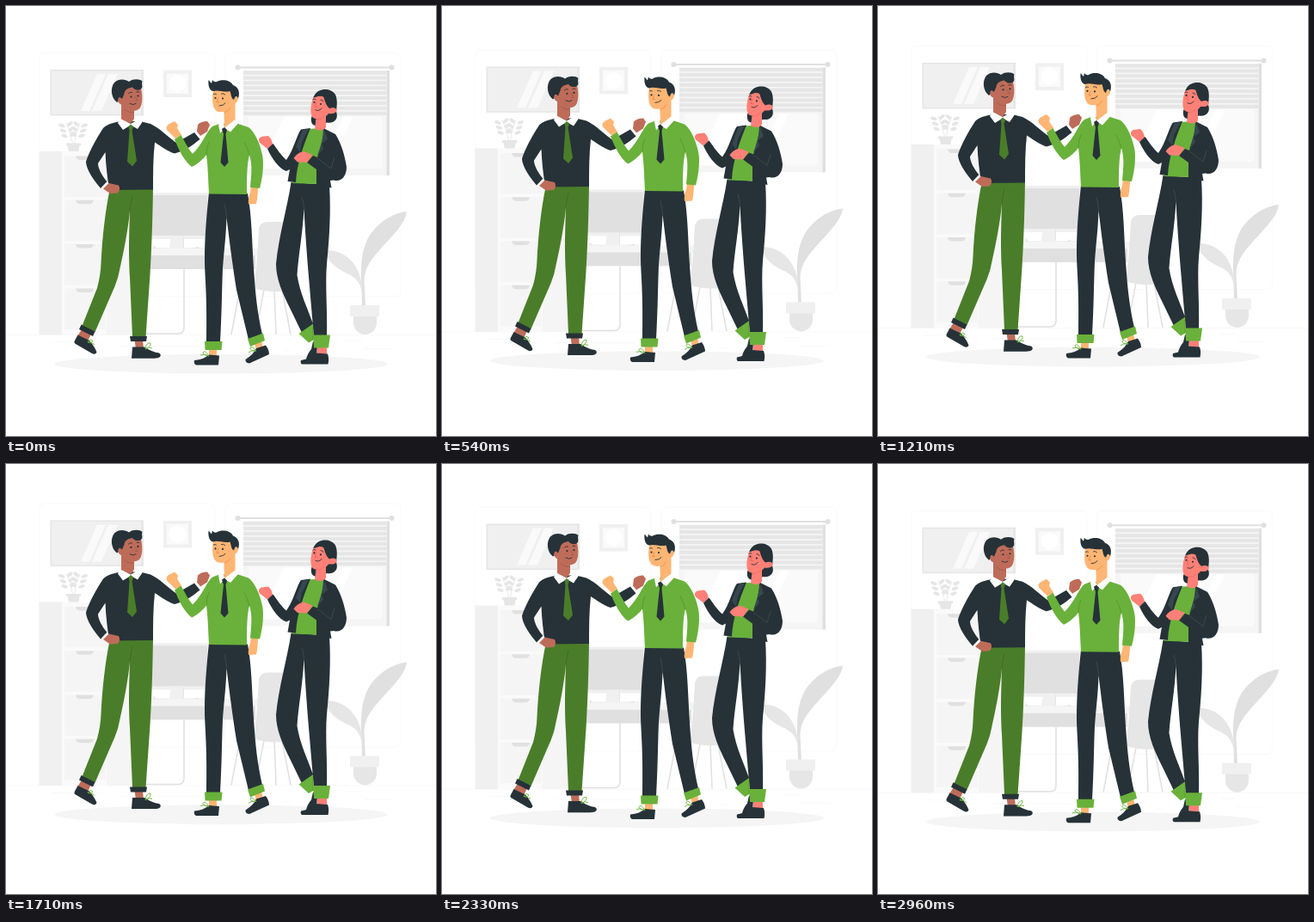
Recreate the animation shown at these times as an HTML page. Size 500x500 px, loop 3 s.

```html
<!DOCTYPE html>
<html lang="en">
<head>
<meta charset="utf-8">
<title>Three colleagues</title>
<style>
  html, body { margin: 0; width: 100%; height: 100%; overflow: hidden; background: #fff; }
  svg { display: block; width: 100%; height: 100%; }
  .pale { fill: #fafafa; } .light { fill: #f5f5f5; } .soft { fill: #f0f0f0; }
  .grey { fill: #e6e6e6; } .mid { fill: #e0e0e0; } .white { fill: #fff; }
  .dark { fill: #263238; } .slate { fill: #37474f; }
  .green { fill: #69b13a; } .moss { fill: #4a7d29; }
  .tan { fill: #be6c59; } .peach { fill: #ffb573; } .pink { fill: #ff8077; }
  .line { fill: none; stroke: #e0e0e0; stroke-width: 1.5; }
  .hair-line { fill: none; stroke: #ebebeb; stroke-width: .3; }
  .ink { fill: none; stroke: #263238; stroke-width: .9; stroke-linecap: round; }
  .lace { fill: none; stroke: #69b13a; stroke-width: .9; }
  .fold { fill: none; stroke: #000; stroke-opacity: .18; stroke-width: .8; }
  .glint { fill: none; stroke: #fff; stroke-opacity: .15; stroke-width: .7; }
</style>
</head>
<body>
<svg viewBox="0 0 500 500">
  <g id="scene">
    <!-- room -->
    <path class="hair-line" d="M0 382.5H500M416.8 398.6h33M322.5 401.3h8.7M396.6 389.3h19.2M52.500 391h43.200M104.600 391h6.300M131.500 395.200h93.700"/>
    <rect class="hair-line" x="38.700" y="54.700" width="204" height="283" rx="5.700"/>
    <rect class="hair-line" x="254.800" y="54.700" width="204" height="283" rx="5.700"/>

    <!-- pictures -->
    <rect class="grey" x="51.500" y="74" width="108.500" height="53.500"/>
    <rect class="soft" x="53" y="75.500" width="104.500" height="50.500"/>
    <path class="pale" d="M106 79h10L97 122H87zM119 79h11l-19 43h-11z"/>
    <rect class="soft" x="183" y="74.500" width="33" height="31.500"/>
    <rect class="pale" x="187" y="78.500" width="25" height="23.500"/>
    <circle class="white" cx="199.500" cy="90" r="10"/>

    <!-- window -->
    <rect class="light" x="276" y="75" width="167" height="122"/>
    <rect class="mid" x="442.500" y="75" width="3.500" height="122"/>
    <rect class="pale" x="282" y="80" width="155" height="109"/>
    <path class="white" d="M324 127h58l-29 62h-58zM393 127h11l-29 62h-11z"/>
    <g id="slats"></g>
    <path class="line" style="stroke-width:2" d="M270 71.500H448"/>
    <circle class="mid" cx="269.500" cy="71.500" r="3"/>
    <circle class="mid" cx="448.500" cy="71.500" r="3"/>

    <!-- cabinet -->
    <rect class="light" x="116" y="169" width="31" height="213.500"/>
    <rect class="pale" x="65" y="169" width="52" height="213.500"/>
    <rect class="soft" x="38.500" y="169" width="26.500" height="213.500"/>
    <g id="drawers"></g>
    <g id="sprigs"></g>
    <path class="grey" d="M70 159.500h17v3h-1.500l-1 6.500H73l-1.500-6.500H70z"/>

    <!-- desk and chair -->
    <rect class="soft" x="164" y="217" width="72" height="54"/>
    <rect class="mid" x="168" y="220" width="66" height="47"/>
    <path class="soft" d="M192 267h14l1 14h-17zM168 281h64v3h-64z"/>
    <path class="grey" d="M206 268h1v13h-1zM172 278l3 4h12v1h-16zM215 282l9-2v3h-10z"/>
    <rect class="light" x="148" y="282" width="146" height="8"/>
    <rect class="mid" x="148" y="290" width="142" height="16"/>
    <path class="line" d="M207 306V374Q207 381 200 381H148"/>
    <path class="line" d="M273 323L262 382M300 330L290 382M312 330L314 382M321 330L331 382"/>
    <path class="grey" d="M294 259Q296 251 304 251H330V331Q305 334 288 328Q292 300 294 259Z"/>

    <!-- floor plant -->
    <path class="mid" d="M413.500 325C411 290 417 268 434 254C444 245 456 240 466 239C465 249 456 260 445 272C430 289 417 300 416.500 320L418 350H414Z"/>
    <path class="grey" d="M414 326C412 303 396 283 372 284C373 298 387 307 399 312C408 317 413 322 415 340Z"/>
    <path class="grey" d="M404 360H431V368A13.500 14 0 0 1 404 368Z"/>
    <rect class="soft" x="400" y="348" width="34" height="13"/>

    <ellipse class="light" cx="250" cy="416.200" rx="193.900" ry="11.300"/>

    <!-- left man -->
    <g>
      <path class="tan" d="M88 376L99 381L95 390L83 384ZM149.500 388H159L160 399H151Z"/>
      <path class="dark" d="M83.500 382.500L97 389Q103 396 105.500 402.500Q104 406 100 404L81 393Q78.500 391.500 80 389Z"/>
      <path class="dark" d="M147 396.500H161Q170 402.500 178 403.500Q181 405.500 179 408Q177 409.700 172 409.700H146Z"/>
      <path class="lace" d="M95 391q2-5 6-1.500q-1 2.500-6 1.500q5 0 8 3M162 399q1-8 6-7q1 4-6 7q5-3 8-1"/>
      <path class="moss" d="M121 212C115 240 112 270 110.500 299Q110 313 106 328L88.500 372L103.500 379L126.500 326Q131 315 132.500 305C137 285 142 260 144 238C143 270 142.500 285 144 315L147 385H162.500L167.500 312C170 270 170.500 240 171 212Z"/>
      <path class="fold" d="M144 238Q145 229 147 221"/>
      <path class="dark" d="M87.500 370.500L103.500 378.500L101 384L85 376ZM144 384H164L163 390H145Z"/>
      <path class="white" d="M219 147L222 145L227 154L224 156Z"/>
      <path class="tan" d="M222 146L223 138Q227 134 234 134L237 138L234 146L226 151Z"/>
      <path class="dark" d="M134 134C127 135 118 137 113 142C105 154 97 169 93 181C93 190 103 204 110.500 212.500L118 205C112 198 107 189 107 183L115.500 170C116 185 118 200 120 214L171 213.500C171 195 171 176 173 158.500C180 163 188 169 196 171.500C207 169 217 162 225.500 155L219 147L198 159C189 153 179 142 168 137L156 134Z"/>
      <path class="white" d="M110 212L117.500 204L120 207L113 214Z"/>
      <path class="tan" d="M113 212.500L119.500 206L131 208.500Q133.500 213 130 217.500L121 218Z"/>
      <path class="white" d="M133.500 130.500L145 137L156 130.500L158.500 135L153 143L145 138.500L136 144L130 136Z"/>
      <path class="tan" d="M134 113H149V131L145 137L134 131.500Z"/>
      <path class="tan" d="M135 100C136 91 154 89 157 96C159 104 159 114 155.500 119C151 124 139 123 135.500 115Q130 114 130 108Q131 104 135 107Z"/>
      <path class="fold" d="M138 120Q143 125 149 123.500"/>
      <path class="dark" d="M129 112C122 107 121 95 126 89C131 84 139 85 143 88C148 84 156 85 158.500 87.500C157 91 160 94 157 96.500C153 99 149 97 147 94.500C143 95 138 97 137.500 102L135 108C131 104 130 108 130.500 111Z"/>
      <path class="moss" d="M142.500 140L145 137.500L148 140L146.500 145L152 180L147 186.500L141 181L143.500 145Z"/>
      <circle class="dark" cx="145.500" cy="105.500" r="1.100"/><circle class="dark" cx="153.500" cy="104.500" r="1.100"/>
      <path class="ink" d="M142.500 101.500q2-2 4-1M152 100q2-1 3 0M144 113.500q4 2.500 7 0"/>
      <path class="fold" d="M150 105l3 5h-3"/>
    </g>

    <!-- middle man -->
    <g>
      <path class="peach" d="M236 398H245V408H236ZM289 392L297 389L299 398L291 401Z"/>
      <path class="dark" d="M219 412Q230 411 236 405.500L248 406.500L247 417.500H221Q218 416 219 412ZM278.500 411Q288 405 291 398L302 394.500Q306 400 306 405L283 415.500Q278 415 278.500 411Z"/>
      <path class="lace" d="M236 407q-5-8-7-4q0 3 7 4q-6-3-10-1M291 401q-6-7-7-3q0 3 7 3q-6-1-9 2"/>
      <path class="dark" d="M236 217C233 245 231 270 231 295C231 315 234 330 233 391H249C251 355 251 330 252 305C254 280 256 265 256.500 246C260 275 263 298 268 330L282 388L298 382C292 355 290 335 288 305C286 275 286 245 281 218Z"/>
      <path class="glint" d="M256.500 246Q256 238 254 230"/>
      <path class="green" d="M231 390H251.500L250.500 400H231.500ZM281 387L299 380.500L301 389L284 396Z"/>
      <path class="peach" d="M285 209H293Q293 221 291 230L282 230.500Q281 224 284 217ZM197 154L187 144Q185 140 190 137L196 134L200 138L199 142L204 150Z"/>
      <path class="green" d="M248 137L240 140C233 146 229 160 217 172C212 166 208 158 203.500 150L196 155C201 168 208 181 216 187C223 184 229 178 233 173C235 188 235 203 236 218.500L280 219C280 201 280 184 283 173C287 185 285 198 284 211L295 212C299 197 300 182 298 173C295 159 289 146 282 141L267 136Z"/>
      <path class="fold" d="M283 174Q281 165 277 158M233 173Q233 164 236 158"/>
      <path class="white" d="M252 131.500L254 141L267 131.500L270 136.500L261 146.500L254 142.500L249 148L247 138Z"/>
      <path class="peach" d="M253 113H266.500V132L254 141.500Z"/>
      <path class="peach" d="M241 98C239.500 108 239.500 117 244 121.500C250 126 261 122 263.500 114Q269.500 113 270 107.500Q269 103.500 265 106L263 96Z"/>
      <path class="fold" style="stroke:#c35c10;stroke-opacity:.4" d="M254 124Q259 122 261 118"/>
      <path class="dark" d="M241 99C236 98 235 92 235.500 86L239 90L240 86Q242 89 245 88C251 84.500 261 86 264 92C270 94 272.500 100 270 107.500C268 103 266 105 265 109C261.500 107 262 103 260.500 99C254 101 247 97 241 99Z"/>
      <path class="dark" d="M251 143L254 141L257 144L255.500 149L258.500 182L254 187L249.500 182L253 149Z"/>
      <circle class="dark" cx="243.500" cy="107" r="1.100"/><circle class="dark" cx="252" cy="107.500" r="1.100"/>
      <path class="ink" d="M241.500 102.500q2-1 3 0M250.500 102q2-1 4 1M248 116q5 0 7-3"/>
      <path class="fold" style="stroke:#c35c10;stroke-opacity:.5" d="M247 107l-2 5h3"/>
    </g>

    <!-- woman -->
    <g>
      <path class="pink" d="M362 395H373V406H362Z"/>
      <path class="dark" d="M357 390L362 394L361 410L349 411Q350 405 355 399Z"/>
      <path class="dark" d="M343 412Q354 410 360 403.500L374 404.500Q376 410 374.500 416.500H344Q342 415 343 412Z"/>
      <path class="dark" d="M331.500 205C327 235 317 268 314 300C314 318 322 335 330 351L344.500 381L357.500 371C351 352 342 335 338.500 313C340 290 345 265 346.500 235C348 265 350 290 352 315L358 385H373C374 355 371 325 373 300C376 270 378 240 376 208Z"/>
      <path class="glint" d="M346.500 235Q346 228 344 222"/>
      <path class="green" d="M340.500 381L357 369.500L358 388L352 391.500Z"/>
      <path class="fold" d="M357 374V388"/>
      <path class="green" d="M357 382.500H377L375 397.500H358Z"/>
      <path class="green" d="M348 143L371 142L373 165L362 207L333 206Z"/>
      <path class="pink" d="M304 166L295 159Q292 154 297 152L305 151Q309 154 310 161Z"/>
      <path class="dark" d="M354 142L343 143.500C338 150 335 166 326 179C320 174 315 166 310.500 160L304 166C309 177 317 189 326 192L330 190L327.500 204L337 205C338 185 345 164 354 142Z"/>
      <path class="dark" d="M369 142L383 149C390 160 394 174 396 187C396 198 390 205 381 202.500L377 203L378.500 211.500L361 208L361 190L350 182L357 174L362 176C366 166 369 154 369 142Z"/>
      <path class="slate" d="M352 143L344 158L342 170L337 164L345 144ZM370 143L374 155L367 160L369 166L362 174Q368 158 370 143Z"/>
      <path class="glint" d="M362 177L378 189L382 176"/>
      <path class="pink" d="M356.500 173L346 169Q338 171 334.500 177L339 181.500L350 182Z"/>
      <path class="dark" d="M359 104C362 96 377 94 383 103C386 110 384.500 117 384 123C387 131 382 137 373 135.500C364 142 355 140 355 133.500Q354 130 357 126Z"/>
      <path class="pink" d="M361 127H372V141Q368 147 359 143Z"/>
      <path class="pink" d="M357 107C354 116 353 126 357 130C363 133 372 130 375 125Q383 126 385 121.500Q383 116.500 376 119C371 115 371 108 368 103Z"/>
      <path class="fold" style="stroke:#d94b45;stroke-opacity:.4" d="M361 132Q367 132 370 128"/>
      <path class="dark" d="M357 107Q359 101 365 99L373 102L376.500 119Q371 113 370 106Q364 103 357 107Z"/>
      <circle class="dark" cx="358.500" cy="112" r="1.100"/><circle class="dark" cx="366" cy="114" r="1.100"/>
      <path class="ink" d="M357 108.500q2-1 3 0M366 109q2 0 3 2M360 121q4 2 7-2"/>
      <path class="fold" style="stroke:#d94b45;stroke-opacity:.6" d="M361 112l-2 5h3"/>
    </g>
  </g>
</svg>
<script>
  const LOOP = 3000, RISE = 10;
  const byId = id => document.getElementById(id);
  const repeat = (count, draw) => Array.from({ length: count }, (_, i) => draw(i)).join('');

  byId('slats').innerHTML = repeat(9, i => {
    const y = 75.5 + i * 5.9;
    return `<rect class="grey" x="276" y="${y}" width="166.5" height="4.4"/>
      <rect class="light" x="276" y="${y + 4.4}" width="166.5" height="1.5"/>`;
  });

  byId('drawers').innerHTML = repeat(4, i => {
    const y = 174.5 + i * 51.3;
    return `<rect class="light" x="68" y="${y}" width="48" height="47.5"/>
      <path class="mid" d="M81 ${y}h21q-1 4.5 -5 4.5h-11q-4 0 -5 -4.5z"/>`;
  });

  const leaf = (x, y, angle) =>
    `<ellipse class="grey" rx="3.8" ry="2" transform="translate(${x} ${y}) rotate(${angle})"/>`;
  byId('sprigs').innerHTML = [-1, 1].map(side =>
    `<path class="line" style="stroke-width:.7" d="M${78.5 + side} 160Q${78 + side * 3} 146 ${78 + side * 8} 136"/>` +
    repeat(3, i => {
      const x = 78 + side * (4 + i * 1.6), y = 152 - i * 6;
      return leaf(x - side * 3.5, y - 3, side * 40) + leaf(x + side * 6, y - 1, side * -20);
    })).join('');

  const scene = byId('scene');
  function render(time) {
    const phase = (time % LOOP) / LOOP;
    const lift = RISE * (1 - Math.abs(1 - 2 * phase));
    scene.setAttribute('transform', `translate(0 ${-lift})`);
  }

  const start = performance.now();
  function tick() {
    render(performance.now() - start);
    requestAnimationFrame(tick);
  }
  tick();
</script>
</body>
</html>
```
